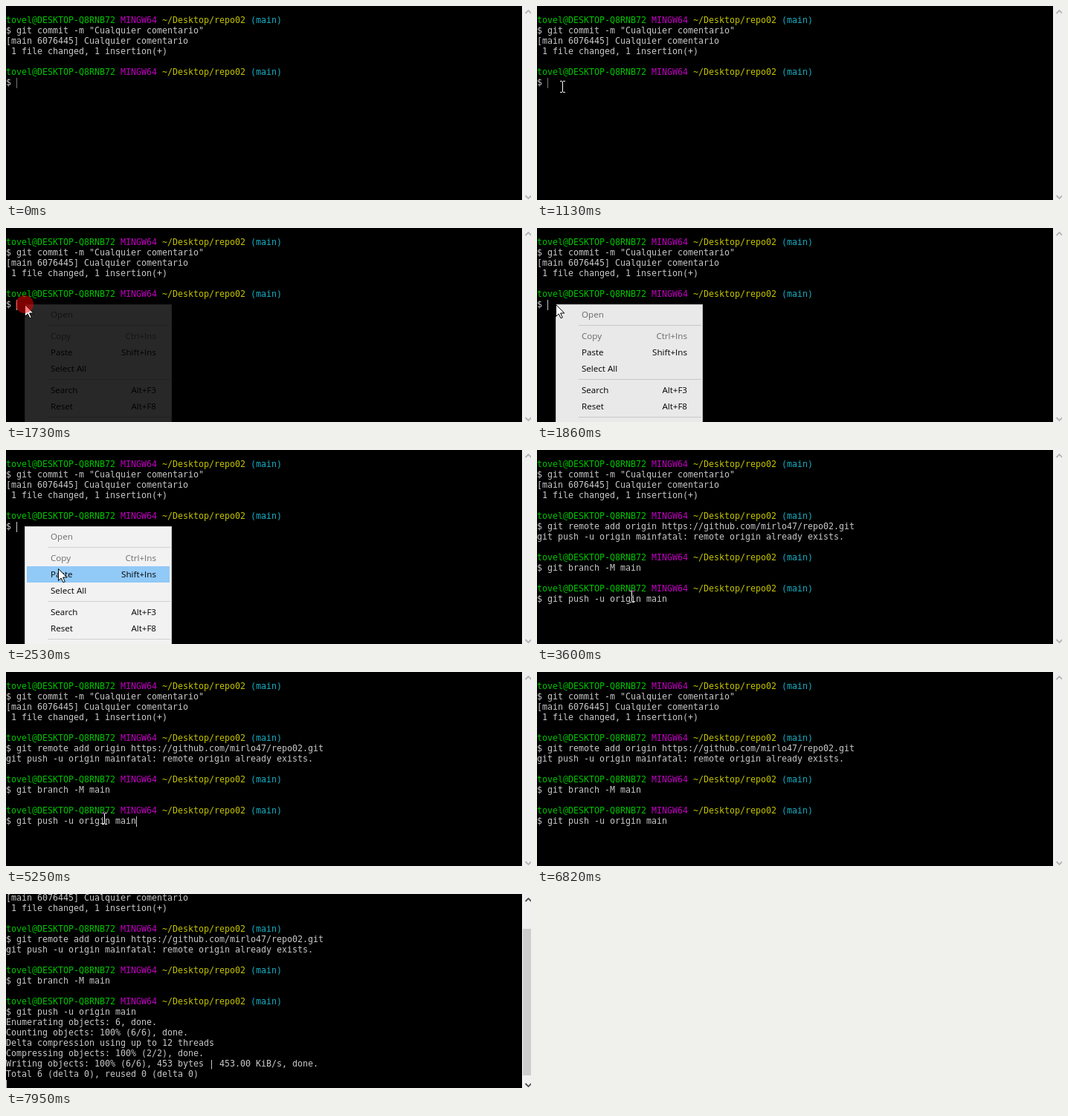
An HTML page with a canvas for the animation above (8000 ms loop, 706 px wide and 262 px high).

```html
<!DOCTYPE html>
<html lang="en">
<head>
<meta charset="utf-8">
<title>Terminal</title>
<style>
  html, body { margin: 0; width: 100%; height: 100%; overflow: hidden; background: #000; }
  canvas { display: block; }
</style>
</head>
<body>
<canvas id="stage" width="706" height="262"></canvas>
<script>
const ctx = document.getElementById('stage').getContext('2d');
const LOOP = 8000, STEP = 200 / 3, CELL = 7, ROW = 14;
const GREY = '#c8c8c8';

const PROMPT = [
  ['tovel@DESKTOP-Q8RNB72', '#00c400'],
  ['MINGW64', '#c000c0'],
  ['~/Desktop/repo02', '#c4c400'],
  ['(main)', '#14b0c4'],
];

// [row, time it appears, text or PROMPT]
const LINES = [
  [1, 0, PROMPT],
  [2, 0, '$ git commit -m "Cualquier comentario"'],
  [3, 0, '[main 6076445] Cualquier comentario'],
  [4, 0, ' 1 file changed, 1 insertion(+)'],
  [6, 0, PROMPT],
  [7, 0, '$ '],
  [7, 2730, '$ git remote add origin https://github.com/mirlo47/repo02.git'],
  [8, 2860, 'git push -u origin mainfatal: remote origin already exists.'],
  [10, 2860, PROMPT],
  [11, 2860, '$ '],
  [11, 3000, '$ git branch -M main'],
  [13, 3070, PROMPT],
  [14, 3070, '$ '],
  [14, 3130, '$ git push -u origin main'],
  [15, 7950, 'Enumerating objects: 6, done.'],
  [16, 7950, 'Counting objects: 100% (6/6), done.'],
  [17, 7950, 'Delta compression using up to 12 threads'],
  [18, 7950, 'Compressing objects: 100% (2/2), done.'],
  [19, 7950, 'Writing objects: 100% (6/6), 453 bytes | 453.00 KiB/s, done.'],
  [20, 7950, 'Total 6 (delta 0), reused 0 (delta 0)'],
];

// [time, column, row, colour]; no column means hidden
const CARET = [
  [0, 2, 7, '#777'], [1730, 2, 7], [2730, 0, 8], [2860, 2, 11], [3000, 20, 11],
  [3070, 2, 14], [3130, 25, 14], [3600], [4130, 25, 14], [4650], [5250, 25, 14],
  [5780], [6290, 0, 15], [6820], [7350, 0, 15], [7880], [7950, 0, 21],
];

// [centre y, label, shortcut, disabled]
const ITEMS = [
  [117, 'Open', '', true],
  [146, 'Copy', 'Ctrl+Ins', true],
  [168, 'Paste', 'Shift+Ins'],
  [190, 'Select All', ''],
  [219, 'Search', 'Alt+F3'],
  [241, 'Reset', 'Alt+F8'],
];

// [from, to, shape, x0, y0, x1, y1, move start, move duration]
const MOUSE = [
  [600, 1730, ibeam, 243, 245, 27, 104, 600, 600],
  [1730, 2730, arrow, 25, 103, 70, 160, 2065, 468],
  [2730, 4000, ibeam, 70, 160, 127, 198, 2935, 530],
  [4000, 6290, ibeam, 127, 198, 132, 198, 3933, 200],
  [7350, 7550, ibeam, 129, 217, 118, 253, 7350, 133],
];

function rect(x, y, w, h, color) {
  ctx.fillStyle = color;
  ctx.fillRect(x, y, w, h);
}

function write(text, x, y, color, align = 'left') {
  ctx.textAlign = align;
  ctx.fillStyle = color;
  ctx.fillText(text, x, y);
}

function ibeam(x, y) {
  ctx.globalCompositeOperation = 'difference';
  for (const dy of [-8, 7]) {
    rect(x - 3, y + dy, 3, 1, '#fff');
    rect(x + 1, y + dy, 3, 1, '#fff');
  }
  rect(x, y - 7, 1, 14, '#fff');
  ctx.globalCompositeOperation = 'source-over';
}

const arrowPath = new Path2D('M.5 .5V16.5L4.2 13L7 18.8L9.3 17.8L6.6 12H11.8Z');
function arrow(x, y) {
  ctx.save();
  ctx.translate(x, y);
  ctx.fillStyle = '#fff';
  ctx.strokeStyle = '#000';
  ctx.lineWidth = 1;
  ctx.fill(arrowPath);
  ctx.stroke(arrowPath);
  ctx.restore();
}

function drawTerminal(t) {
  const scroll = t >= 7950 ? 3 : 0;
  const top = row => (row - scroll) * ROW - 1;
  ctx.font = '11.63px "DejaVu Sans Mono", monospace';
  for (const [row, start, text] of LINES) {
    if (t < start) continue;
    const y = top(row) + 10;
    if (text !== PROMPT) {
      // a later, longer line replaces the shorter one on its row
      if (!LINES.some(l => l[0] === row && l[1] > start && t >= l[1])) write(text, 0, y, GREY);
      continue;
    }
    let x = 0;
    for (const [part, color] of PROMPT) {
      write(part, x, y, color);
      x += (part.length + 1) * CELL;
    }
  }
  const [, col, row, color = GREY] = CARET.filter(c => t >= c[0]).pop();
  if (col !== undefined) rect(col * CELL, top(row), 1, ROW, color);
}

function drawItem([y, label, keys, off]) {
  const color = off ? '#6d6d6d' : '#000';
  write(label, 60, y + 4, color);
  write(keys, 202, y + 4, color, 'right');
}

// Fades whatever fills the box towards the black terminal
function dim(x, y, w, h, opacity) {
  rect(x, y, w, h, `rgba(0, 0, 0, ${1 - opacity})`);
}

function drawMenu(t) {
  if (t < 1730 || t >= 2930) return;
  ctx.font = '11.6px "Open Sans", sans-serif';
  if (t < 2730) {
    rect(25, 103, 198, 159, '#ccc');
    rect(26, 104, 196, 158, '#f2f2f2');
    for (const y of [131, 204, 255]) rect(56, y, 165, 1, '#d0d0d0');
    if (t >= 2470) rect(28, 157, 192, 22, '#91c9f7');
    ITEMS.forEach(drawItem);
    dim(25, 103, 198, 159, t < 1800 ? 0.165 : t < 1860 ? 0.6 : t < 1930 ? 0.96 : 1);
  } else {
    rect(28, 157, 192, 22, '#91c9f7');
    drawItem(ITEMS[2]);
    dim(28, 157, 192, 22, t < 2800 ? 1 : t < 2860 ? 0.79 : 0.35);
  }
}

function drawMouse(t) {
  const m = MOUSE.find(([from, to]) => t >= from && t < to);
  if (!m) return;
  const [, , shape, x0, y0, x1, y1, start, span] = m;
  const tick = Math.floor((t + 8) / STEP) * STEP;
  const p = Math.min(1, Math.max(0, (tick - start) / span));
  const e = p * p * (3 - 2 * p);
  shape(Math.round(x0 + (x1 - x0) * e), Math.round(y0 + (y1 - y0) * e));
}

function drawClick(t) {
  if (t < 1730 || t >= 1800) return;
  ctx.fillStyle = 'rgba(255, 0, 0, .49)';
  ctx.beginPath();
  ctx.arc(25, 103, 12, 0, 7);
  ctx.fill();
}

function drawScrollbar(t) {
  const active = t >= 7950;
  rect(694, 0, 12, 262, '#f0f0f0');
  rect(694, 0, 1, 262, '#fff');
  if (active) rect(695, 47, 11, 198, '#cdcdcd');
  ctx.strokeStyle = active ? '#505050' : '#b4b4b4';
  ctx.lineWidth = 1.8;
  for (const [y, d] of [[10, -4], [256, 4]]) {
    ctx.beginPath();
    ctx.moveTo(698.5, y);
    ctx.lineTo(702.5, y + d);
    ctx.lineTo(706.5, y);
    ctx.stroke();
  }
}

let origin;
function frame(now) {
  origin ??= now;
  const t = (now - origin) % LOOP;
  rect(0, 0, 706, 262, '#000');
  drawTerminal(t);
  drawMenu(t);
  drawMouse(t);
  drawClick(t);
  drawScrollbar(t);
  requestAnimationFrame(frame);
}
requestAnimationFrame(frame);
</script>
</body>
</html>
```
